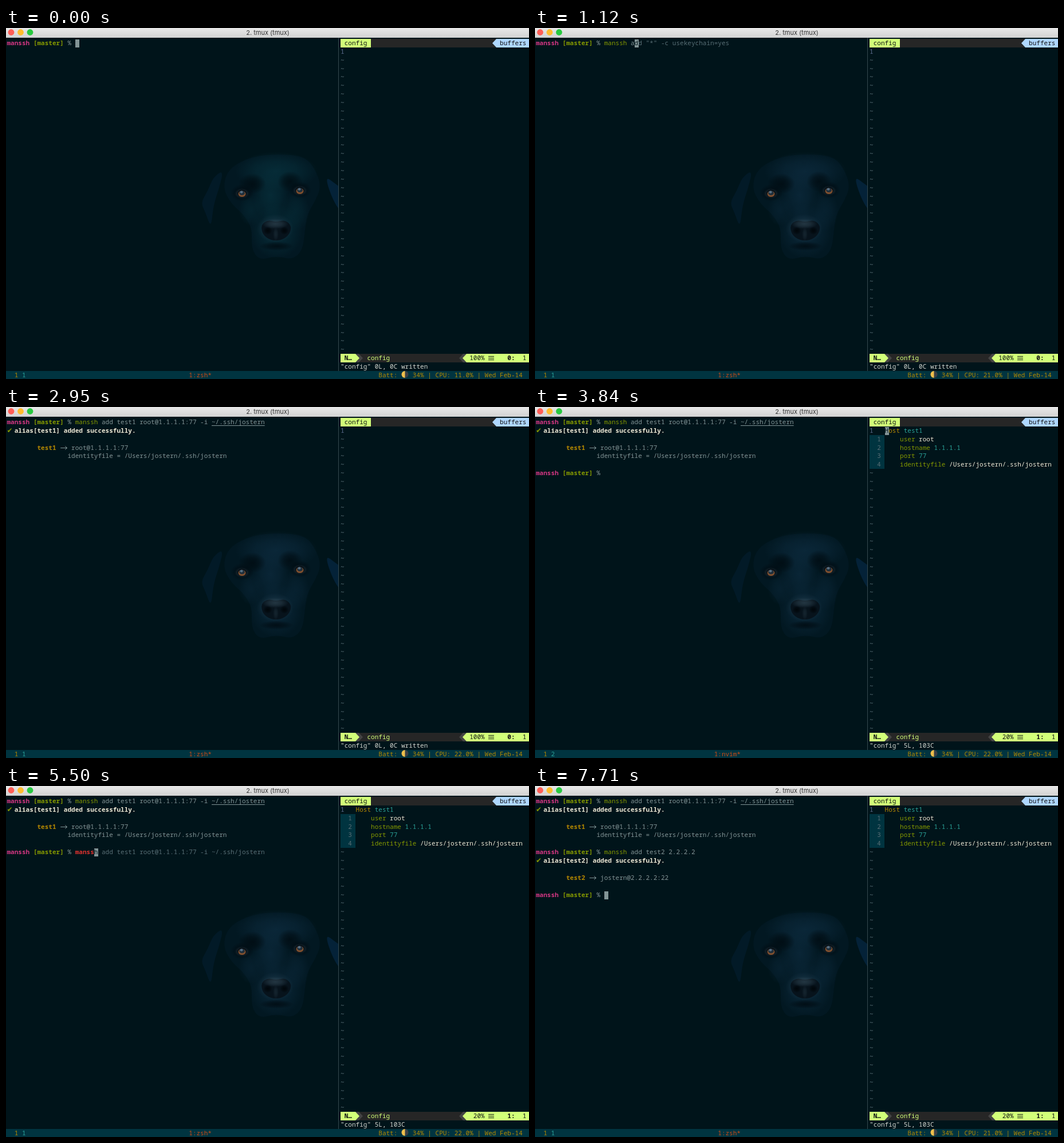
An HTML page with a canvas for the animation above (8000 ms loop, 913 by 613 pixels).

```html
<!DOCTYPE html>
<html lang="en">
<head>
<meta charset="utf-8">
<title>Terminal</title>
<style>
html, body { margin: 0; width: 100%; height: 100%; overflow: hidden; background: #00141a; }
canvas { display: block; }
</style>
</head>
<body>
<canvas id="stage" width="913" height="613"></canvas>
<script>
const ctx = document.getElementById('stage').getContext('2d');
const LOOP = 8000, CELL = 6.62, LINE = 14.87, LEFT = 1.5;
const MONO = '"Noto Sans Mono", "DejaVu Sans Mono", monospace';
const C = {
  bg: '#00141a', bar: '#003440', fg: '#839496', dim: '#586e75', bright: '#eee8d5',
  green: '#859900', pink: '#d33682', red: '#dc322f', orange: '#cb4b16', yellow: '#b58900',
  cyan: '#2aa198', lime: '#d2ff79', sky: '#afd7ff', gray: '#262626', mid: '#444444'
};

const KEY = '/.ssh/jostern';
const ADD1 = 'manssh add test1 root@1.1.1.1:77 -i ~' + KEY;
const ADD2 = 'manssh add test2 2.2.2.2';
const commands = [
  { row: 0, full: ADD1, accept: 2680, enter: 2950,
    history: ['manssh add "*" -c usekeychain=yes', ADD2, ADD1],
    keys: [80, 230, 380, 520, 670, 820, 970, 1120, 1300, 1430, 1570, 1700, 1840, 1970, 2060, 2150] },
  { row: 6, full: ADD2, accept: 7000, enter: 7450,
    history: [ADD1, ADD2],
    keys: [4820, 4990, 5160, 5330, 5500, 5580, 5715, 5850, 6020, 6130, 6240, 6350, 6460, 6640, 6760, 6880] }
];
const cpuSteps = [[0, 11], [670, 21], [2240, 22], [4130, 19], [4990, 22], [6130, 21]];

const colX = col => LEFT + col * CELL;
const rowY = row => Math.round(19 + row * LINE);

function rect(x, y, w, h, color) {
  ctx.fillStyle = color;
  ctx.fillRect(x, y, w, h);
}

function poly(color, ...points) {
  ctx.fillStyle = color;
  ctx.beginPath();
  points.forEach(([x, y]) => ctx.lineTo(x, y));
  ctx.fill();
}

function disc(x, y, r, color, from = 0, to = Math.PI * 2) {
  ctx.fillStyle = color;
  ctx.beginPath();
  ctx.arc(x, y, r, from, to);
  ctx.fill();
}

// Every glyph sits on the terminal grid.
function text(col, row, str, color = C.fg, bold = false) {
  ctx.font = `${bold ? 'bold ' : ''}11px ${MONO}`;
  ctx.textAlign = 'left';
  ctx.fillStyle = color;
  [...str].forEach((ch, i) => ctx.fillText(ch, colX(col + i), rowY(row) + 11));
}

function cursor(col, row, ch = ' ') {
  rect(Math.round(colX(col)), rowY(row) + 1, 7, 14, C.fg);
  text(col, row, ch, C.bg);
}

function smooth(color, points) {
  const mid = (a, b) => [(a[0] + b[0]) / 2, (a[1] + b[1]) / 2];
  ctx.fillStyle = color;
  ctx.beginPath();
  ctx.moveTo(...mid(points[points.length - 1], points[0]));
  points.forEach((p, i) => ctx.quadraticCurveTo(...p, ...mid(p, points[(i + 1) % points.length])));
  ctx.fill();
}

function glow(x, y, rx, ry, rgb, alpha) {
  ctx.save();
  ctx.translate(x, y);
  ctx.scale(rx, ry);
  const g = ctx.createRadialGradient(0, 0, 0, 0, 0, 1);
  g.addColorStop(0, `rgba(${rgb},${alpha})`);
  g.addColorStop(0.5, `rgba(${rgb},${alpha * 0.65})`);
  g.addColorStop(1, `rgba(${rgb},0)`);
  disc(0, 0, 1, g);
  ctx.restore();
}

function eye(x, y) {
  glow(x, y, 20, 15, '0,10,16', 0.9);
  glow(x, y + 1, 13, 9, '48,62,72', 0.8);
  ctx.save();
  ctx.translate(x, y + 1);
  ctx.scale(1, 0.8);
  disc(0, 0, 8, '#061017');
  disc(0, 1, 6.5, '#80502f');
  disc(0, -1, 4.8, '#20303d');
  disc(-1, -3, 2.6, '#587084');
  ctx.restore();
}

function dog(teal) {
  const light = teal ? '7,48,60' : '12,42,61';
  ctx.save();
  ctx.beginPath();
  ctx.rect(0, 17, 580, 582);
  ctx.clip();
  smooth('#021a27', [[380, 248], [362, 260], [352, 285], [340, 305], [348, 322], [358, 350], [362, 310], [372, 280]]);
  smooth('#042238', [[556, 258], [575, 272], [592, 285], [592, 330], [572, 305]]);
  smooth('#021822', [[388, 245], [430, 224], [475, 220], [522, 224], [542, 250], [550, 278], [540, 302],
    [526, 325], [522, 352], [518, 388], [500, 405], [472, 398], [442, 406], [428, 385], [430, 350],
    [414, 325], [394, 308], [378, 280]]);
  glow(472, 250, 72, 34, light, 0.8);
  glow(462, 292, 32, 48, light, 0.75);
  glow(428, 318, 22, 28, light, 0.45);
  glow(505, 320, 25, 35, light, 0.5);
  glow(472, 355, 46, 48, light, 0.75);
  glow(430, 272, 24, 18, '0,12,18', 0.85);
  glow(496, 268, 22, 18, '0,12,18', 0.85);
  eye(412, 288);
  eye(513, 283);
  glow(470, 350, 32, 25, '30,57,73', 0.85);
  smooth('#07131c', [[445, 344], [457, 335], [471, 339], [487, 335], [499, 346], [494, 362], [480, 371], [462, 371], [448, 361]]);
  glow(470, 342, 23, 9, '50,73,87', 0.65);
  glow(457, 354, 8, 7, '0,6,10', 0.95);
  glow(486, 354, 8, 7, '0,6,10', 0.95);
  glow(471, 360, 5, 12, '34,54,66', 0.5);
  glow(472, 381, 30, 8, '0,10,16', 0.8);
  ctx.restore();
}

function titleBar() {
  const g = ctx.createLinearGradient(0, 0, 0, 17);
  g.addColorStop(0, '#e8e8e8');
  g.addColorStop(1, '#d2d2d2');
  rect(0, 0, 913, 17, g);
  ['#ff5f57', '#ffbd2e', '#28c940'].forEach((color, i) => disc(9 + i * 16.5, 7.5, 5.4, color));
  ctx.font = '11px Inter, Roboto, sans-serif';
  ctx.textAlign = 'center';
  ctx.fillStyle = '#333';
  ctx.fillText('2. tmux (tmux)', 457, 11.5);
}

function prompt(row) {
  text(0, row, 'manssh', C.pink, true);
  text(7, row, '[master]', C.green, true);
  text(16, row, '%');
}

function arrow(col, row) {
  const x = colX(col) + 1, y = rowY(row) + 7.5;
  ctx.strokeStyle = C.fg;
  ctx.lineWidth = 1;
  ctx.beginPath();
  ctx.moveTo(x, y);
  ctx.lineTo(x + 11.5, y);
  ctx.moveTo(x + 8, y - 3);
  ctx.lineTo(x + 11.5, y);
  ctx.lineTo(x + 8, y + 3);
  ctx.stroke();
}

function commandLine(cmd, t) {
  const { row, full, keys, accept, enter, history } = cmd;
  const count = t >= accept ? full.length : keys.filter(k => t >= k).length;
  const typed = full.slice(0, count);
  const hint = count ? history.find(h => h.startsWith(typed)) : '';
  const word = typed.slice(0, 6);
  const valid = word === 'man' || word === 'manssh';
  text(18, row, word, valid ? C.green : C.red, !valid);
  text(24, row, typed.slice(6));
  text(18 + count, row, hint.slice(count), C.dim);
  const path = typed.indexOf('~');
  if (path >= 0) rect(colX(18 + path), rowY(row) + 13, (count - path) * CELL, 1, C.fg);
  return t < enter ? () => cursor(18 + count, row, hint[count]) : null;
}

function result(row, alias, target) {
  ctx.font = '12px "DejaVu Sans", sans-serif';
  ctx.textAlign = 'left';
  ctx.fillStyle = C.green;
  ctx.fillText('✔', 1.5, rowY(row) + 11);
  text(2, row, `alias[${alias}] added successfully.`, C.bright, true);
  text(8, row + 2, alias, C.yellow, true);
  arrow(14, row + 2);
  text(17, row + 2, target);
}

function shell(t, active) {
  prompt(0);
  let drawCursor = commandLine(commands[0], t);
  if (t >= 2950) {
    result(1, 'test1', 'root@1.1.1.1:77');
    text(16, 4, 'identityfile = /Users/jostern' + KEY);
  }
  if (t >= 3040) {
    prompt(6);
    drawCursor = commandLine(commands[1], t);
  }
  if (t >= 7600) result(7, 'test2', 'jostern@2.2.2.2:22');
  if (t >= 7710) {
    prompt(11);
    drawCursor = () => cursor(18, 11);
  } else if (t >= 7450 && t < 7600) {
    drawCursor = () => cursor(0, 7);
  }
  if (active && drawCursor) drawCursor();
}

function editor(loaded, active) {
  const x = 584, top = rowY(0), base = rowY(37), mid = base + 7.5, end = base + 15;
  rect(580, 17, 1, 582, '#34484e');

  rect(x, top, 329, 15, C.gray);
  rect(x, top, 53, 15, C.lime);
  text(89, 0, 'config', '#111');
  poly(C.sky, [849, top + 7.5], [856, top], [913, top], [913, top + 15], [856, top + 15]);
  text(130, 0, 'buffers', '#111');

  text(88, 1, '1', '#5d6e91');
  if (loaded) {
    text(92, 1, 'Host', C.yellow);
    text(97, 1, 'test1', C.cyan);
    const options = [['user', 'root', C.bright], ['hostname', '1.1.1.1', C.cyan], ['port', '77', C.cyan],
      ['identityfile', '/Users/jostern' + KEY, C.bright]];
    rect(x, rowY(2), 26, rowY(6) - rowY(2), C.bar);
    options.forEach(([name, value, color], i) => {
      text(90, i + 2, String(i + 1), C.dim);
      text(96, i + 2, name, C.green);
      text(97 + name.length, i + 2, value, color);
    });
  }
  for (let row = loaded ? 6 : 2; row <= 36; row++) text(88, row, '~', '#657b83');
  if (active) cursor(92, 1, loaded ? 'H' : ' ');

  rect(x, base, 329, 15, C.gray);
  poly(C.mid, [610, base], [616, base], [623, mid], [616, end], [610, end]);
  poly(C.lime, [x, base], [610, base], [617, mid], [610, end], [x, end]);
  text(89, 37, 'N…', '#111', true);
  text(95, 37, 'config', C.lime);
  poly(C.mid, [791, mid], [798, base], [805, base], [805, end], [798, end]);
  poly(C.lime, [797, mid], [804, base], [913, base], [913, end], [804, end]);
  text(122, 37, loaded ? ' 20%' : '100%', '#111');
  for (let i = 0; i < 3; i++) rect(842, base + 4 + i * 3, 10, 1, '#111');
  text(132, 37, loaded ? '1:' : '0:', '#111', true);
  text(136, 37, '1', '#111');
  text(88, 38, loaded ? '"config" 5L, 103C' : '"config" 0L, 0C written', '#d4d6cf');
}

function statusBar(t, inEditor) {
  const cpu = cpuSteps.filter(([at]) => t >= at).pop()[1];
  rect(0, 599, 913, 14, C.bar);
  text(2, 39, '1', C.yellow);
  text(4, 39, inEditor ? '2' : '1', C.cyan);
  text(inEditor ? 47 : 48, 39, inEditor ? '1:nvim*' : '1:zsh*', C.orange);
  text(98, 39, 'Batt:', C.yellow);
  disc(696.5, 605, 6, '#3b4046');
  disc(696.5, 605, 6, '#f0c04c', Math.PI / 2, Math.PI * 1.5);
  text(107, 39, `34% | CPU: ${cpu}.0% | Wed Feb-14`, C.yellow);
}

function draw(t) {
  const inEditor = t >= 3660 && t < 4550;
  rect(0, 0, 913, 613, C.bg);
  dog(t < 80);
  titleBar();
  shell(t, !inEditor);
  editor(t >= 3840, inEditor);
  statusBar(t, inEditor);
}

let start;
function tick(now) {
  start ??= now;
  draw((now - start) % LOOP);
  requestAnimationFrame(tick);
}
draw(0);
requestAnimationFrame(tick);
</script>
</body>
</html>
```
